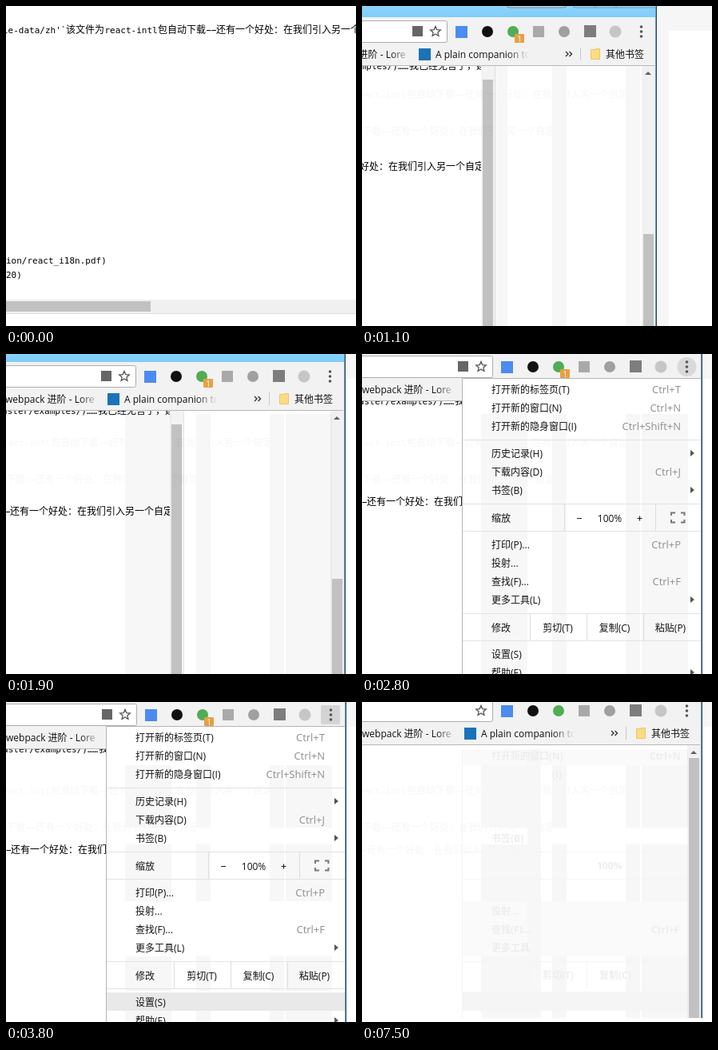
Animation, 438 px wide and 400 px high, one loop 8 s. Source, as an HTML page:

```html
<!DOCTYPE html>
<html lang="zh">
<head>
<meta charset="utf-8">
<title>Browser menu</title>
<style>
html, body { margin: 0; width: 100%; height: 100%; overflow: hidden; background: #fff; }
svg { display: block; width: 438px; height: 400px; }
text { white-space: pre; }
.ui { font: 12px "Open Sans", "Noto Sans CJK SC", "Noto Sans CJK", sans-serif; fill: #111; }
.code { font: 11px "DejaVu Sans Mono", monospace; }
.han { font: 12px "Noto Sans CJK SC", "Noto Sans CJK", sans-serif; }
.key { font-size: 13px; fill: #8e8e8e; text-anchor: end; }
.mid { text-anchor: middle; }
.faint .ui { fill: #ededed; font-weight: bold; }
#remains { mix-blend-mode: multiply; }
</style>
</head>
<body>
<svg id="stage" viewBox="0 0 438 400"></svg>
<script>
const stage = document.getElementById('stage');
const LOOP = 8000;

// window offset: [time, x, y]
const path = [
  [0, 314, -171], [500, 308, -168], [600, 288, -156], [700, 246, -130],
  [800, 180, -90], [900, 88, -44], [1000, 16, -8], [1100, 0, 0],
  [1300, 8, 0], [1400, 20, 0], [1500, 35, 0],
  [1700, 42, -1], [1800, 51, -2], [1900, 56, -4], [2000, 57, -16],
  [7400, 57, -18], [7500, 57, -21]
];
// highlighted menu row: [time, row centre]
const hovers = [
  [0, 0], [2900, 44], [3000, 67], [3100, 90], [3200, 170], [3300, 0],
  [3400, 261], [3500, 284], [3600, 307], [3700, 0], [3800, 375]
];

const rect = (x, y, w, h, fill, more = '') =>
  `<rect x="${x}" y="${y}" width="${w}" height="${h}" fill="${fill}" ${more}/>`;
const text = (x, y, cls, s) => `<text x="${x}" y="${y}" class="${cls}">${s}</text>`;
const dot = (x, y, r, fill) => `<circle cx="${x}" cy="${y}" r="${r}" fill="${fill}"/>`;
const group = (id, body, more = '') => `<g id="${id}" ${more}>${body}</g>`;
const clip = (id, body) => `<clipPath id="${id}">${body}</clipPath>`;
const stroke = (d, color, w = 1) =>
  `<path d="${d}" fill="none" stroke="${color}" stroke-width="${w}"/>`;

function star(cx, cy) {
  const points = Array.from({ length: 10 }, (_, i) => {
    const r = i % 2 ? 3 : 6.6, a = i * Math.PI / 5 - Math.PI / 2;
    return (cx + r * Math.cos(a)).toFixed(1) + ',' + (cy + r * Math.sin(a)).toFixed(1);
  });
  return `<polygon points="${points.join(' ')}" fill="none" stroke="#555" stroke-width="1.3"/>`;
}

const sentence =
  text(-318, 205, 'code', "le-data/zh'`") +
  text(-239, 205, 'han', '该文件为') +
  text(-190.5, 205, 'code', 'react-intl') +
  text(-124, 205, 'han', '包自动下载') +
  '<path d="M-63 201.5h5.5m1 0h5.5" stroke="currentColor"/>' +
  text(-51, 205, 'han', '还有一个好处：在我们引入另一个自定');

const article =
  group('sentence', sentence) +
  `<text x="45" y="79" class="code" text-anchor="end">master/examples/)</text>` +
  text(45, 79, 'code', '……') +
  text(59, 79, 'han', '我已经无言了，建') +
  text(-314, 493, 'code', 'ion/react_i18n.pdf)') +
  text(-314, 511, 'code', '20)');

const innerBars =
  rect(-400, 538, 549, 17, '#f0f0f0') + rect(-400, 540, 267, 13, '#c1c1c1') +
  rect(-400, 555, 566, 1, '#dcdcdc') +
  rect(149, 75, 17, 480, '#f3f3f3') + rect(151, 92, 13, 440, '#c1c1c1') +
  rect(166, 75, 1, 480, '#e6e6e6');

const outerBar =
  rect(350, 75, 17, 600, '#f1f1f1') +
  '<path d="M354 86h8l-4-4z" fill="#606060"/>';

const toolbar =
  rect(-400, -30, 768, 44, 'url(#sky)') +
  '<path d="M181-6v5q0 3 4 3h67q4 0 4-3v-5" fill="#b9d7e8" stroke="#6d8798"/>' +
  stroke('M264-6v5q0 3 3 3h101M292-6v8M318-6v8', '#7398ad') +
  rect(-400, 14, 767, 61, '#f2f2f2') +
  rect(-400, 74, 767, 1, '#b8b8b8') +
  rect(-400.5, 18.5, 507, 27, '#fff', 'rx="2" stroke="#adadad"') +
  group('pageTool', rect(63, 25, 13, 13, '#666')) + star(92, 32) +
  rect(117, 25, 15, 15, '#4c8bf0') +
  dot(157, 32, 7, '#111') +
  dot(189, 32, 7, '#4fad55') +
  group('badge', rect(191, 35, 12, 11, '#e6a045', 'rx="1"') +
    `<text x="197" y="44.5" class="ui mid" style="font-size:10px;fill:#fff">1</text>`) +
  rect(214, 25, 14, 14, '#a9a9a9') +
  dot(253, 32, 7, '#a0a0a0') +
  rect(278, 24, 15, 15, '#7d7d7d') +
  dot(317, 32, 7.5, '#c6c6c6') +
  group('ripple', dot(349.5, 32, 12, '#d9d9d9')) +
  group('button', rect(337, 20, 24, 24, '#d4d4d4', 'rx="2"')) +
  [26, 32, 38].map(y => dot(349.5, y, 1.8, '#555')).join('') +
  text(-57, 65, 'ui', 'webpack 进阶 - Lore') +
  rect(36, 50, 25, 20, 'url(#fade)') + rect(61, 50, 9, 20, '#f2f2f2') +
  rect(71, 53, 15, 15, '#1b72b8') +
  text(92, 65, 'ui', 'A plain companion to') +
  rect(182, 50, 27, 20, 'url(#fade)') + rect(209, 50, 30, 20, '#f2f2f2') +
  stroke('M255 57l3 3-3 3M259.5 57l3 3-3 3', '#333', 1.4) +
  rect(273, 52, 1, 16, '#c9c9c9') +
  '<path d="M286.5 54.5h6v-1h5v13h-11z" fill="#fbdc83" stroke="#e9c566"/>' +
  text(305, 65, 'ui', '其他书签');

const edge = rect(366, 14, 1, 700, '#e3ecf1') + rect(367, 0, 1, 700, '#6f9db8') +
  rect(368, 0, 1, 700, '#27485a');

// pale remains of earlier window positions
const band = (x, w) => rect(x, 75, w, 325, '#f7f7f7');
const oldBands = band(166, 16) + band(238, 18) + band(330, 18);
const newBands = band(149, 58) + band(350, 58);
const wash =
  rect(125, 59, 283, 20, '#fafafa') + rect(125, 249, 283, 69, '#fafafa') +
  rect(207, 59, 17, 341, '#f7f7f7') + rect(125, 362, 283, 24, '#f5f5f5') +
  stroke('M125.5 59V400M126 187.5H408M126 221.5H408M126 324.5H408M210.5 325v33M281.5 325v33', '#f4f4f4') +
  '<g class="faint">' +
  [[162, 72, '打开新的窗口(N)'], [360, 72, 'Ctrl+N'], [238, 95, '(I)'], [162, 175, '书签(B)'],
   [294, 209, '100%'], [162, 266, '投射...'], [162, 289, '查找(F)...'], [362, 289, 'Ctrl+F'],
   [162, 312, '更多工具'], [226, 346, '剪切(T)'], [297, 346, '复制(C)']]
    .map(a => text(a[0], a[1], 'ui', a[2])).join('') + '</g>';
const echo = (id, x, y, area) =>
  `<g id="${id}" clip-path="url(#${area})" fill="#f6f6f6" color="#f6f6f6">` +
  `<use href="#sentence" x="${x}" y="${y}"/></g>`;

const rows = [
  [44, '打开新的标签页(T)', 'Ctrl+T'], [67, '打开新的窗口(N)', 'Ctrl+N'],
  [90, '打开新的隐身窗口(I)', 'Ctrl+Shift+N'], [124, '历史记录(H)', '>'],
  [147, '下载内容(D)', 'Ctrl+J'], [170, '书签(B)', '>'], [205, '缩放'],
  [238, '打印(P)...', 'Ctrl+P'], [261, '投射...'], [284, '查找(F)...', 'Ctrl+F'],
  [307, '更多工具(L)', '>'], [342, '修改'], [375, '设置(S)'], [398, '帮助(E)', '>']
];
const rowMarkup = ([y, label, extra]) =>
  text(162, y + 4.5, 'ui', label) +
  (extra === '>' ? `<path d="M411 ${y - 4}v8l5-4z" fill="#555"/>`
    : extra ? text(399, y + 5, 'ui key', extra) : '');

const menu =
  rect(126, 0, 298, 23, '#e9e9e9', 'id="hover"') +
  stroke('M126 107.5H424M126 187.5H424M126 221.5H424M126 324.5H424M126 358.5H424', '#e3e3e3') +
  stroke('M253.5 188v33M367.5 188v33M210.5 325v33M281.5 325v33M352.5 325v33', '#dcdcdc') +
  stroke('M125.5 400V30.5H424', '#b5b5b5') +
  rows.map(rowMarkup).join('') +
  stroke('M269 205.5h6M344.5 205.5h6M347.5 202.5v6', '#222', 1.2) +
  text(310, 209.5, 'ui mid', '100%') +
  stroke('M387 202v-3.5h5M399 198.5h4.5v3.5M403.5 207v3.5h-4.5M392 210.5h-5v-3.5', '#777', 2) +
  text(245, 346.5, 'ui mid', '剪切(T)') + text(316, 346.5, 'ui mid', '复制(C)') +
  text(386, 346.5, 'ui mid', '粘贴(P)');

const stops = (a, b) =>
  `<stop offset="0" stop-color="${a[0]}" stop-opacity="${a[1]}"/><stop offset="1" stop-color="${b[0]}" stop-opacity="${b[1]}"/>`;

stage.innerHTML =
  '<defs>' +
  `<linearGradient id="sky" x2="0" y2="1">${stops(['#b4e0f8', 1], ['#7ecdfb', 1])}</linearGradient>` +
  `<linearGradient id="fade">${stops(['#f2f2f2', 0], ['#f2f2f2', 1])}</linearGradient>` +
  clip('textArea', rect(-400, 75, 549, 463, '#000')) +
  clip('wide', rect(0, 75, 330, 325, '#000')) +
  clip('middle', rect(0, 75, 238, 325, '#000')) +
  clip('keptRows', rect(125, 79, 299, 78, '#000') + rect(125, 178, 299, 71, '#000') +
    rect(125, 318, 299, 44, '#000') + rect(125, 386, 299, 14, '#000')) +
  '</defs>' +
  rect(0, 0, 438, 400, '#fff') +
  group('trail', rect(366, 0, 72, 31, '#f6f6f6') + rect(366, 31, 18, 369, '#f6f6f6')) +
  group('trailEnd', rect(384, 0, 54, 31, '#f6f6f6')) +
  group('page', rect(-400, 75, 767, 700, '#fff') +
    group('article', `<g clip-path="url(#textArea)">${article}</g>` + innerBars) +
    group('bar', outerBar + group('shortThumb', rect(352, 285, 13, 400, '#c1c1c1')) +
      group('longThumb', rect(352, 91, 13, 500, '#c1c1c1'))), 'class="win"') +
  group('head', toolbar + edge, 'class="win"') +
  rect(125, 30, 299, 372, '#fff', 'id="menuSheet"') +
  group('remains', group('bands', oldBands + group('moreBands', newBands)) + group('wash', wash) +
    echo('echo1', 180, -90, 'wide') + echo('echo2', 88, -44, 'middle') +
    echo('echo3', 57, -16, 'middle')) +
  group('menu', menu) +
  rect(0, 0, 438, 10, '#fff', 'id="floor"');

const el = Object.fromEntries([...stage.querySelectorAll('[id]')].map(e => [e.id, e]));
const wins = stage.querySelectorAll('.win');
const show = (id, on) => { el[id].style.display = on ? '' : 'none'; };
const latest = (list, t) => list.reduce((found, item) => item[0] <= t ? item : found);

function draw(t) {
  const [, x, y] = latest(path, t);
  wins.forEach(w => w.setAttribute('transform', `translate(${x} ${y})`));

  const blank = t >= 4700;
  show('trail', t >= 1100 && t < 1300);
  show('trailEnd', t >= 1100);
  show('bands', t >= 1100);
  show('moreBands', t >= 1900);
  show('echo1', t >= 900);
  show('echo2', t >= 1000);
  show('echo3', blank);
  show('wash', blank);
  // hovering the menu wipes the bands from the rows it touched
  if (t >= 3500) el.bands.setAttribute('clip-path', 'url(#keptRows)');
  else el.bands.removeAttribute('clip-path');

  show('article', !blank);
  show('pageTool', !blank);
  show('badge', !blank);
  show('bar', !blank || t >= 5200);
  show('shortThumb', !blank);
  show('longThumb', blank);

  const open = t >= 2700 && t < 4600;
  const pressed = t >= 2700 && t < 2900;
  show('ripple', pressed);
  show('button', t >= 2500 && t < 4600 && !pressed);
  show('menuSheet', open);
  show('menu', open);
  const row = latest(hovers, t)[1];
  show('hover', row > 0);
  el.hover.setAttribute('y', row - 12);

  show('floor', t >= 7400);
  el.floor.setAttribute('y', t >= 7500 ? 395 : 398);
}

const start = performance.now();
function tick() {
  draw((performance.now() - start) % LOOP);
  requestAnimationFrame(tick);
}
tick();
</script>
</body>
</html>
```
